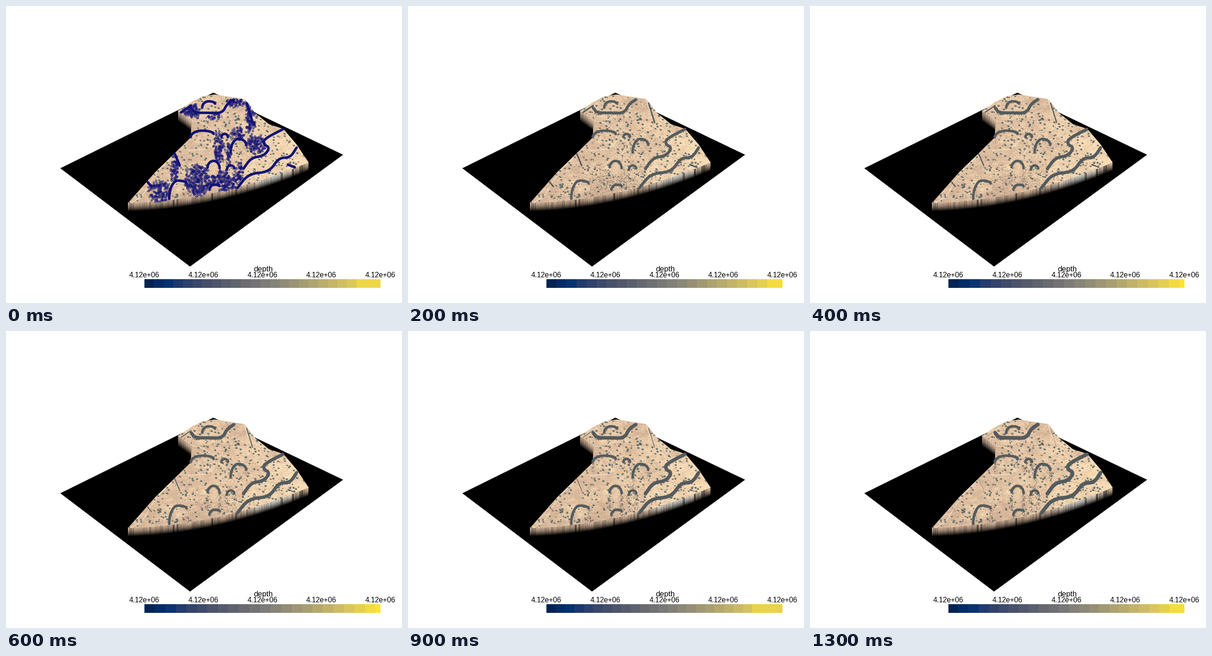
These frames come from a looping animation (864 px wide and 648 px high, 1400 ms). A matplotlib script:

```python
import numpy as np
import matplotlib.pyplot as plt
from matplotlib.animation import FuncAnimation
from matplotlib.patches import Polygon
from matplotlib.path import Path

W, H, FRAMES = 864, 648, 14
GREY, NAVY = "#545b5d", "#111177"
rng = np.random.default_rng(12)

fig = plt.figure(figsize=(W / 72, H / 72), dpi=72, facecolor="white")
ax = fig.add_axes([0, 0, 1, 1])
ax.axis("off")

BLOCK = [(452.5, 189), (735.5, 324.5), (401.5, 568.5), (118.5, 354)]
BACK_EDGE = [(266, 430), (325, 363), (403, 287), (405, 250), (375, 229), (400, 212),
             (428, 197), (455, 193), (520, 203), (543, 233), (574, 258), (605, 268),
             (634, 302), (660, 341)]

RIVERS = [
    [(404, 222), (412, 233), (440, 233), (472, 234), (482, 214), (497, 204)],
    [(604, 269), (563, 290), (562, 302), (576, 309), (563, 327), (535, 331), (518, 355)],
    [(634, 309), (620, 331), (595, 331), (575, 362), (529, 366), (505, 397)],
]
# Centre, top, half width, left drop, right drop; listed in the order they start to trickle
ARCHES = [
    (453, 338, 13, 14, 16), (490, 348, 8, 9, 6), (375, 381, 19, 40, 6), (455, 390, 11, 11, 3),
    (507, 290, 17, 30, 13), (428, 272, 25, 14, 7), (442, 208, 14, 14, 5), (477, 279, 7, 7, 7),
]
# Short strokes that dry up: start and end
STROKES = [(525, 212, 538, 254), (368, 322, 379, 348), (309, 384, 317, 394),
           (615, 346, 630, 352), (382, 232, 404, 217)]
# Flooded patches: centre and radii
PATCHES = [(335, 405, 22, 22), (367, 357, 8, 30), (418, 380, 27, 34), (472, 383, 30, 25),
           (464, 308, 11, 32), (504, 279, 16, 13), (486, 325, 5, 30), (545, 301, 21, 19),
           (533, 240, 10, 42), (405, 230, 17, 15), (453, 239, 13, 9), (502, 211, 21, 9),
           (509, 362, 9, 20)]


def smooth(points, rounds=3):
    p = np.array(points, float)
    for _ in range(rounds):
        a, b = p[:-1], p[1:]
        cut = np.stack([.75 * a + .25 * b, .25 * a + .75 * b], 1).reshape(-1, 2)
        p = np.vstack([p[:1], cut, p[-1:]])
    return p


def arch(cx, top, half, left, right):
    a = np.linspace(0, np.pi, 40)
    drop = np.where(a < np.pi / 2, left, right)
    return np.c_[cx - half * np.cos(a), top + drop * (1 - np.sin(a))]


def resample(p, step):
    d = np.r_[0, np.cumsum(np.hypot(*np.diff(p, axis=0).T))]
    s = np.arange(0, d[-1], step)
    return np.c_[np.interp(s, d, p[:, 0]), np.interp(s, d, p[:, 1])]


def front_edge(x):
    t = (x - 266) / 395
    return 430 - 89 * t + 80 * t * (1 - t)


front_x = np.linspace(660, 266, 40)
OUTLINE = np.vstack([BACK_EDGE, np.c_[front_x, front_edge(front_x)]])
LAND = Path(OUTLINE)


def on_land(points):
    return points[LAND.contains_points(points)]


def scatter_on_land(density):
    lo, hi = OUTLINE.min(0), OUTLINE.max(0)
    return on_land(rng.uniform(lo, hi, (int(np.prod(hi - lo) * density), 2)))


def patch_points(density):
    """Soft-edged ellipses of points that leave the inside of the arches dry."""
    groups = []
    for cx, cy, rx, ry in PATCHES:
        n = int(np.pi * rx * ry * density)
        r, a = np.sqrt(rng.random(n)) + rng.normal(0, .13, n), rng.uniform(0, 2 * np.pi, n)
        groups.append(np.c_[cx + rx * r * np.cos(a), cy + ry * r * np.sin(a)])
    p = on_land(np.vstack(groups))
    x, y = p.T
    for cx, top, half, *_ in ARCHES:
        dry = (abs(x - cx) < .75 * half) & (y > top) & (y < top + 2.3 * half)
        p, x, y = p[~dry], x[~dry], y[~dry]
    return p


def noise(cell_x, cell_y):
    grid = rng.normal(size=(int(H / cell_y) + 2, int(W / cell_x) + 2))
    y, x = np.arange(H) / cell_y, np.arange(W) / cell_x
    iy, ix = y.astype(int), x.astype(int)
    fy, fx = (y - iy)[:, None], x - ix
    rows = grid[iy] * (1 - fy) + grid[iy + 1] * fy
    return rows[:, ix] * (1 - fx) + rows[:, ix + 1] * fx


def show(image, **kw):
    return ax.imshow(image, extent=(0, W, H, 0), interpolation="nearest",
                     aspect="auto", **kw)


def draw_walls():
    x, y = np.arange(W) + .5, np.arange(H)[:, None] + .5
    streak = .86 + .07 * rng.normal(size=W) + .06 * np.repeat(rng.normal(size=W // 4), 4)
    streak[np.repeat(rng.random(W // 4) < .07, 4)] *= .55
    streak = np.clip(streak, .25, 1)
    pale = np.exp(-((x - 585) / 45) ** 2)[:, None]
    tone = (np.array([214, 184, 158]) * (1 - pale) + np.array([226, 226, 218]) * pale) / 255
    image = np.zeros((H, W, 4))
    notch = 229 + (x - 375) * .72
    for top, height, x0, x1 in ((front_edge(x), 18, 266, 660), (notch, 22, 375, 405)):
        s = (y - top) / height
        inside = (s > -.1) & (s < 1) & (x > x0) & (x < x1)
        light = (1 - np.clip(s, 0, 1) ** 1.5) * streak
        image[inside] = np.dstack([light[..., None] * tone, np.ones((H, W))])[inside]
    show(image, zorder=2)


def draw_land():
    shade = (.53 + .13 * noise(45, 26) + .12 * noise(15, 8) + .1 * noise(5, 3)
             + .15 * rng.normal(size=(H, W)) + (np.arange(W) - 470) / 800)
    shade = np.clip(shade, 0, 1)[..., None]
    land = np.array([202, 167, 142]) * (1 - shade) + np.array([252, 225, 186]) * shade
    clip = Polygon(OUTLINE, transform=ax.transData)
    show(land / 255, zorder=3).set_clip_path(clip)

    roads = [[(405, 250), (440, 258), (460, 290), (440, 313), (398, 315)],
             [(272, 430), (300, 414), (325, 365), (362, 330)],
             [(520, 205), (530, 240), (574, 259)]]
    for points in roads:
        line, = ax.plot(*smooth(points).T, color="#f8ecd9", lw=1.5, alpha=.75, zorder=4)
        line.set_clip_path(clip)

    trees = scatter_on_land(.008)
    size = rng.uniform(7, 34, len(trees))
    crown = Path(Path.unit_circle().vertices * (1.15, .85), Path.unit_circle().codes)
    for shift, scale, color in ((0, 1, "#858a7e"), (.7, .5, "#4a5d62")):
        ax.scatter(*(trees + shift).T, s=size * scale, c=color, marker=crown,
                   alpha=.8, lw=0, zorder=5).set_clip_path(clip)
    ax.scatter(*scatter_on_land(.012).T, s=1.6, c="#8b8274", lw=0, alpha=.7, zorder=5)


def make_grains():
    """Rows of x, y, threshold, fading strength, growing strength, starting step."""
    groups = []

    def add(points, fade, grow, start):
        n = len(points)
        columns = [np.broadcast_to(v, n) for v in (fade, grow, start)]
        groups.append(np.c_[points, rng.random(n), np.transpose(columns)])

    loose = patch_points(.3)
    distance = np.hypot(*(loose - (450, 372)).T)
    add(loose, .15 + .7 * np.exp(-(distance / 60) ** 2), 0, 0)
    for path in paths:
        p = resample(path, .6)
        add(p + rng.normal(0, 2.2, p.shape), 0, .9, -6)
    for order, path in enumerate(arches):
        for x, y in path[[0, -1]]:
            length = .22 * (y - 190)
            n = int(2 * length)
            fall = np.c_[rng.normal(x, 2.6, n), y + length * rng.random(n)]
            add(on_land(fall), .15, .7, 2 + .8 * order)
    return np.vstack(groups)


ax.add_patch(Polygon(BLOCK, color="black", lw=0, zorder=1))
draw_walls()
draw_land()

rivers = [smooth(p) for p in RIVERS]
arches = [arch(*a) for a in ARCHES]
strokes = [np.reshape(s, (2, 2)) for s in STROKES]
paths = rivers + arches
# Early and late line width of each kind of channel
widths = [(5.5, 8)] * len(rivers) + [(5, 5.5)] * len(arches) + [(4, .5)] * len(strokes)
lines = [ax.plot(*p.T, solid_capstyle="round", zorder=7)[0] for p in paths + strokes]

grains = make_grains()
grain_dots = ax.scatter([], [], s=2.4, c=GREY, lw=0, alpha=.8, zorder=8)
haze = ax.scatter(*patch_points(.1).T, s=19, facecolor="#1a1a7a70",
                  edgecolor="#111177a0", lw=.8, zorder=6)

bar = ax.imshow(np.zeros((1, 515, 3)), extent=(302, 817, 615, 596), aspect="auto",
                interpolation="nearest", zorder=9)
# Width of the last colour step in each frame
BAR_CAPS = [52] + [33] * 2 + [11] * 4 + [66] * 3 + [33] * 4
ax.set(xlim=(0, W), ylim=(H, 0))

label = dict(family="Liberation Sans", ha="center", va="baseline", color="black")
ax.text(561.5, 579, "depth", size=16.8, **label)
for k in range(5):
    ax.text(302 + 128.6 * k, 592, "4.12e+06", size=15.8, **label)


def bar_colors(cap):
    edges = np.linspace(0, 515 - cap, 23).round().astype(int)
    edges = np.r_[edges, 515]
    widths = np.diff(edges)
    colors = plt.get_cmap("cividis")((edges[:-1] + .35 * widths) / 515)[:, :3]
    return np.repeat(colors, widths, axis=0)[None]


def update(i):
    flooded = i == 0
    progress = (max(i - 1, 0) / 12) ** .6
    for line, (early, late) in zip(lines, widths):
        line.set_linewidth(5.5 if flooded else early + (late - early) * progress)
        line.set_color(NAVY if flooded else GREY)
    haze.set_visible(flooded)
    x, y, threshold, fade, grow, start = grains.T
    strength = fade * np.exp(-i / 2) + grow * np.clip((i - start) / 6, 0, 1)
    grain_dots.set_offsets(grains[threshold < strength, :2])
    grain_dots.set_visible(not flooded)
    bar.set_data(bar_colors(BAR_CAPS[i]))
    return []


anim = FuncAnimation(fig, update, frames=FRAMES, interval=100, repeat=True, repeat_delay=0)
plt.show()
```
